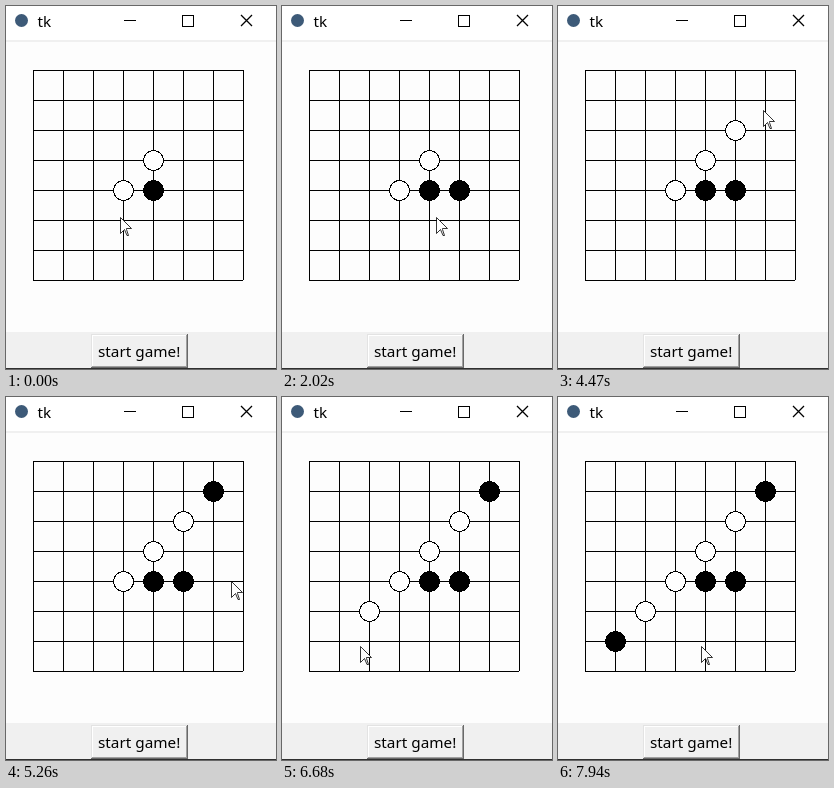
Recreate the animation shown at these times as an HTML page. Size 270 by 363 pixels, loop 8 s.

```html
<!DOCTYPE html>
<html lang="en">
<head>
<meta charset="utf-8">
<title>tk</title>
<style>
html, body { margin: 0; width: 100%; height: 100%; overflow: hidden; background: #fff; }
svg { display: block; width: 100%; height: 100%; }
text { font: 15.3px "Noto Sans", "Open Sans", sans-serif; fill: #000; }
.line { fill: none; stroke: #000; }
.stone { stroke: #000; }
.crisp, .stone { shape-rendering: crispEdges; }
#cursor { fill: #fff; stroke: #000; stroke-width: .8; stroke-linejoin: bevel; }
</style>
</head>
<body>
<svg viewBox="0 0 270 363">
  <rect width="270" height="363" fill="#fff"/>
  <rect y="36" width="270" height="290" fill="#fdfdfd"/>
  <circle cx="15.5" cy="14.5" r="6.5" fill="#3d5a78"/>
  <text x="31.6" y="21">tk</text>
  <path class="line crisp" d="M118 14.5h12M176.5 9.5h11v11h-11z"/>
  <path class="line" stroke-width="1.3" d="M235 9l11 11M246 9l-11 11"/>
  <path fill="#f0f0f0" d="M0 34h270v2H0zM0 326h270v37H0z"/>
  <path id="grid" class="line crisp"/>
  <g id="stones"></g>
  <g class="crisp">
    <path fill="#e3e3e3" d="M85 328h97v1H86v33h-1z"/>
    <path fill="#fff" d="M86 329h95v1H87v31h-1z"/>
    <path fill="#a0a0a0" d="M180 329h1v32H86v-1h94z"/>
    <path fill="#696969" d="M181 328h1v34H85v-1h96z"/>
    <path fill="#303030" d="M0 362h270v1H0z"/>
  </g>
  <text x="92" y="351">start game!</text>
  <path id="cursor" class="crisp" d="M.5 .5V16.5L4.5 12.5 7 18.5H8.5L6.5 12.5V11.5H11.5Z"/>
</svg>
<script>
const LOOP = 8000, STEP = 130, CELL = 30, LEFT = 27, TOP = 64;
const $ = id => document.getElementById(id);

// column, row, time; white and black take turns
const turns = [
  [3, 4, 0], [4, 4, 0], [4, 3, 0], [5, 4, 1390],
  [5, 2, 3190], [6, 1, 4610], [2, 5, 6390], [1, 6, 7280]
];

// pointer stops: first step, last step, x, y
const stops = [
  [0, 0, 114, 211], [120, 520, 178, 184], [1660, 2020, 154, 211],
  [2860, 3020, 174, 129], [3360, 3530, 128, 221], [3960, 4480, 208, 99],
  [5020, 5260, 225, 184], [5380, 5950, 159, 227], [6110, 6390, 87, 216],
  [6530, 6680, 78, 249], [6960, 7120, 59, 245], [7450, 7940, 143, 249]
];

let lines = '';
for (let i = 0; i < 8; i++) {
  const d = i * CELL + 0.5;
  lines += `M${LEFT} ${TOP + d}h210M${LEFT + d} ${TOP}v210`;
}
$('grid').setAttribute('d', lines);

const stones = turns.map(([col, row, time], i) => {
  const el = document.createElementNS('http://www.w3.org/2000/svg', 'circle');
  const attrs = {
    class: 'stone', fill: i % 2 ? '#000' : '#fff', r: 10,
    cx: LEFT + col * CELL + 0.5, cy: TOP + row * CELL + 0.5
  };
  for (const key in attrs) el.setAttribute(key, attrs[key]);
  $('stones').append(el);
  return { el, time };
});

// The pointer slows towards each stop and moves in visible steps.
function pointerAt(t) {
  const i = stops.findLastIndex(s => s[0] <= t);
  const [start, end, x, y] = stops[i];
  const [, , fromX, fromY] = stops[Math.max(i - 1, 0)];
  const gaps = Math.max(1, Math.round((end - start) / STEP));
  const gap = (end - start) / gaps || 1;
  const p = Math.min(1, (Math.floor((t - start) / gap + 1e-6) + 1) / (gaps + 1));
  const ease = p * (2 - p);
  const mix = (a, b) => Math.round(a + (b - a) * ease);
  return [mix(fromX, x), mix(fromY, y)];
}

function draw() {
  const t = performance.now() % LOOP;
  for (const { el, time } of stones)
    el.setAttribute('visibility', t >= time ? 'visible' : 'hidden');
  $('cursor').setAttribute('transform', `translate(${pointerAt(t)})`);
  requestAnimationFrame(draw);
}
draw();
</script>
</body>
</html>
```
